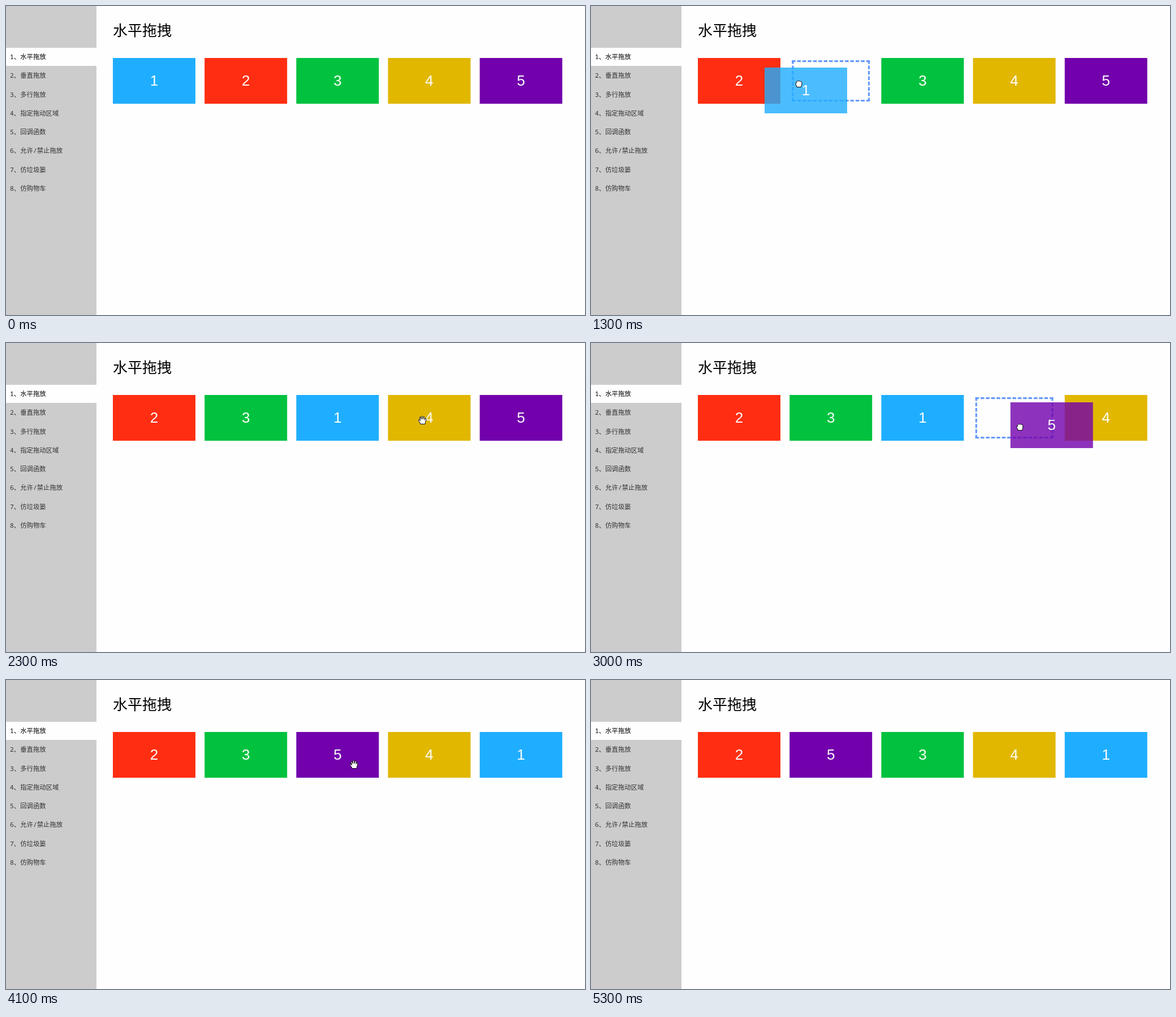
An HTML page for the animation above (5800 ms loop, 1024 px wide and 547 px high).

```html
<!DOCTYPE html>
<html lang="zh-CN">
<head>
<meta charset="utf-8">
<title>水平拖拽</title>
<style>
  html, body { margin: 0; width: 100%; height: 100%; overflow: hidden; background: #fefefe; }
  svg { display: block; width: 1024px; height: 547px; }
  .title { font: 26px "Noto Sans CJK SC", "Noto Sans CJK", sans-serif; }
  .menu text { font: 11.37px "Noto Sans Mono", "Noto Sans CJK SC", "Noto Sans CJK", monospace; fill: #333; }
  .menu .active { fill: #000; }
  .card text { font: 26px "Liberation Sans", Arial, sans-serif; fill: #fff; text-anchor: middle; }
  #holder path { fill: none; stroke: #69f; stroke-width: 3.2; }
  #holder .across { stroke-dasharray: 6.5 2.9; }
  #holder .down { stroke-dasharray: 6.5 3; }
  #cursor path { fill: #fff; stroke: #000; stroke-width: 1; stroke-linejoin: round; }
</style>
</head>
<body>
<svg viewBox="0 0 1024 547">
  <rect width="1024" height="547" fill="#fefefe"/>
  <rect width="160" height="547" fill="#ccc"/>
  <rect y="74" width="160" height="32" fill="#fefefe"/>
  <g class="menu" id="menu"></g>
  <text class="title" x="189" y="53">水平拖拽</text>
  <g id="holder">
    <path class="across" d="M4 5.7H142M4 75.5H142"/>
    <path class="down" d="M5.7 4V77M140.3 4V77"/>
  </g>
  <g id="cards"></g>
  <g id="cursor">
    <path id="arrow" d="M-5.5-8V6L-2.3 3.2L.1 8.4L2.4 7.4L.1 2.3H4.7Z"/>
    <path id="open" d="M-3.5 7L-4.5 4.5L-7 1Q-7.5-1-5.5-.5L-3.8 1L-5.2-4Q-5-6-3.4-5.2L-2-1.5L-2.2-6.2Q-1-8 .3-6.2L.8-1.5L1.8-5.8Q3.3-6.8 4-5.2L3.6-.8L5-3Q6.8-3.2 6.6-1.5L5.2 4L4.5 7Z"/>
    <path id="closed" d="M-3.5 6L-4 3.5L-5.7 1.5Q-6-.8-4.3-.8L-4.2-3.5Q-3-5.5-1.7-4.2Q-.2-6 1.2-4.4Q2.8-5.2 3.6-3.6Q5.6-3.8 5.5-1.5L5 3L4 6Z"/>
  </g>
</svg>
<script>
const NS = "http://www.w3.org/2000/svg";
const LOOP = 5800, TICK = 100;
const LEFT = 189, TOP = 92, PITCH = 162.2, CARD_W = 146, CARD_H = 81;
const COLORS = ["#1faeff", "#ff2e12", "#00c23f", "#e1b700", "#7200ac"];
const MENU = ["水平拖放", "垂直拖放", "多行拖放", "指定拖动区域", "回调函数", "允许/禁止拖放", "仿垃圾篓", "仿购物车"];

// Exponents for x and y progress: below 1 eases out, above 1 eases in
const EVEN = [1, 1], GLIDE = [0.3, 0.3];

const DRAGS = [
  { card: 1, start: 11, stop: 14, drop: 15, grab: [250, 121], move: [151, 23], bend: [0.6, 0.8] },
  { card: 1, start: 20, stop: 22, drop: 23, grab: [393, 139], move: [155, 0], bend: EVEN },
  { card: 5, start: 27, stop: 32, drop: 33, grab: [855, 136], move: [-160, 14], bend: [1, 0.15] },
  { card: 1, start: 36, stop: 39, drop: 40, grab: [641, 143], move: [290, -9], bend: [3.4, 3.4] },
  { card: 3, start: 46, stop: 48, drop: 50, grab: [472, 157], move: [205, -3], bend: EVEN }
];

// The pointer enters, glides from drop to grab, and leaves
const STOPS = [
  { t: 3, at: [603, 121], bend: EVEN },
  { t: 8, at: [217, 188], bend: EVEN },
  { t: 10, at: DRAGS[0].grab, bend: EVEN },
  ...DRAGS.flatMap(({ start, stop, drop, grab, move, bend }) => {
    const end = grab.map((v, i) => v + move[i]);
    return [
      { t: start, at: grab, bend: GLIDE },
      { t: stop, at: end, bend },
      { t: drop - 1, at: end, bend }
    ];
  }),
  { t: 52, at: [854, 146], bend: EVEN }
];

const $ = id => document.getElementById(id);
const slotX = i => LEFT + PITCH * i;
const place = (el, x, y) => el.setAttribute("transform", `translate(${x} ${y})`);
const show = (el, on) => el.setAttribute("visibility", on ? "visible" : "hidden");

function add(parent, tag, attrs, text = "") {
  const el = document.createElementNS(NS, tag);
  for (const key in attrs) el.setAttribute(key, attrs[key]);
  el.textContent = text;
  return parent.appendChild(el);
}

MENU.forEach((label, i) => add($("menu"), "text",
  { x: 7, y: 94 + 33.25 * i, class: i ? "" : "active" }, `${i + 1}、${label}`));

const cards = COLORS.map((fill, i) => {
  const card = add($("cards"), "g", { class: "card" });
  add(card, "rect", { width: CARD_W, height: CARD_H, fill });
  add(card, "text", { x: CARD_W / 2, y: 49 }, i + 1);
  return card;
});

function pointerAt(tick) {
  const next = STOPS.findIndex(s => s.t >= tick);
  if (next < 0 || tick < STOPS[0].t) return null;
  const b = STOPS[next], a = STOPS[Math.max(0, next - 1)];
  const k = b === a ? 0 : (tick - a.t) / (b.t - a.t);
  return a.at.map((v, i) => Math.round(v + (b.at[i] - v) * k ** b.bend[i]));
}

// Replays the drags up to a tick; a dragged card takes the nearest slot
function layoutAt(tick) {
  const order = [1, 2, 3, 4, 5];
  let held = null;
  for (const { card, start, drop, grab } of DRAGS) {
    if (tick < start) break;
    const now = pointerAt(Math.min(tick, drop - 1));
    const from = order.indexOf(card);
    const x = slotX(from) + now[0] - grab[0], y = TOP + now[1] - grab[1];
    const slot = Math.max(0, Math.min(4, Math.round((x - LEFT) / PITCH)));
    order.splice(from, 1);
    order.splice(slot, 0, card);
    if (tick < drop) held = { card, x, y, slot };
  }
  return { order, held };
}

function overCard([x, y]) {
  const within = (x - LEFT) % PITCH;
  return y >= TOP && y < TOP + CARD_H && within >= 0 && within < CARD_W;
}

let raised = null;

function draw(time) {
  const tick = Math.floor((time % LOOP) / TICK);
  const { order, held } = layoutAt(tick);
  order.forEach((id, i) => {
    const card = cards[id - 1], dragged = held && held.card === id;
    place(card, dragged ? held.x : slotX(i), dragged ? held.y : TOP);
    card.setAttribute("opacity", dragged ? 0.8 : 1);
  });
  const top = held ? cards[held.card - 1] : null;
  if (top && top !== raised) $("cards").appendChild(top);
  raised = top;

  show($("holder"), held);
  if (held) place($("holder"), slotX(held.slot), TOP);

  const pointer = pointerAt(tick);
  const shape = !pointer ? "" : held ? "closed" : overCard(pointer) ? "open" : "arrow";
  for (const id of ["arrow", "open", "closed"]) show($(id), id === shape);
  if (pointer) place($("cursor"), pointer[0] - 0.5, pointer[1] - 0.5);
}

const began = performance.now();
function frame() {
  draw(performance.now() - began);
  requestAnimationFrame(frame);
}
frame();
</script>
</body>
</html>
```
